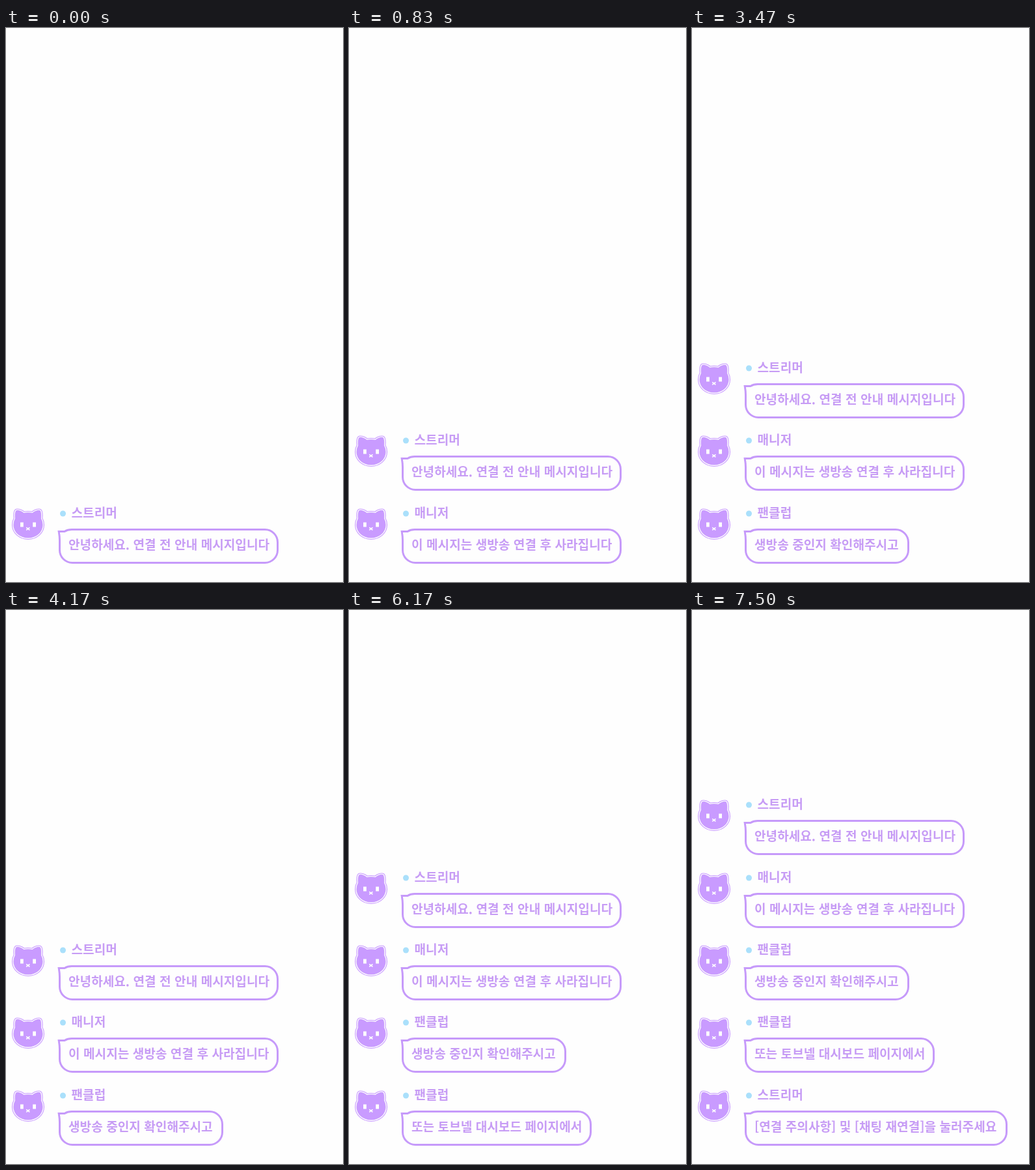
Animation of 518x850 px, one loop 8 s. Source, as an HTML page:

```html
<!DOCTYPE html>
<html lang="ko">
<head>
<meta charset="utf-8">
<title>채팅 안내</title>
<style>
  html, body { margin: 0; width: 100%; height: 100%; overflow: hidden; background: #fefefe; }
  svg { display: block; width: 518px; height: 850px; }
  text {
    font: 700 19.1px "Noto Sans CJK KR", "Noto Sans KR", "Noto Sans CJK", "Noto Sans CJK JP", sans-serif;
    word-spacing: .1px;
    fill: #c79cf5;
  }
  .bubble { fill: none; stroke: #c69afa; stroke-width: 3; stroke-linejoin: miter; }
  .dot { fill: #aae0fb; }
</style>
</head>
<body>
<svg id="stage" viewBox="0 0 518 850">
  <defs>
    <path id="head" d="M14 752.5C13.4 747 14 742 15.4 740.4C17.4 738.8 24 740.6 27.4 744Q34 742.6 40.6 744C44 740.6 50.6 738.8 52.6 740.4C54 742 54.6 747 54 752.5Q56.6 757 56.6 762.4A22.6 20.2 0 0 1 11.4 762.4Q11.4 757 14 752.5Z"/>
    <g id="cat">
      <use href="#head" fill="#c99bff" stroke="#c99bff" stroke-width="4.8"/>
      <use href="#head" fill="#c99bff" stroke="#fefefe" stroke-width="2.6"/>
      <use href="#head" fill="#c99bff"/>
      <path d="M22 758.5h4.8v7H22zM41.2 758.5h4.8v7h-4.8z" fill="#fefefe"/>
      <path d="M31.2 766.4l5.2 4M36.4 766.4L31.2 770.4" stroke="#fefefe" stroke-width="1.7"/>
    </g>
  </defs>
</svg>
<script>
const LOOP = 8000;
const LIFT = [0, 112, 223, 334, 446];
const FADE = [[0, .08], [30, .4], [70, .7], [100, 1]];
const QUICK = [[0, .08], [30, .55], [70, 1]];

// start time, right edge of the bubble, name, message, fade steps
const ROWS = [
  [0, 419, "스트리머", "안녕하세요. 연결 전 안내 메시지입니다", [[0, 1]]],
  [730, 419, "매니저", "이 메시지는 생방송 연결 후 사라집니다", FADE],
  [3400, 334, "팬클럽", "생방송 중인지 확인해주시고", QUICK],
  [6070, 373, "팬클럽", "또는 토브넬 대시보드 페이지에서", FADE],
  [7400, 485, "스트리머", "[연결 주의사항] 및 [채팅 재연결]을 눌러주세요", FADE]
];

const stage = document.getElementById("stage");

function add(parent, tag, attrs, text) {
  const el = document.createElementNS("http://www.w3.org/2000/svg", tag);
  for (const key in attrs) el.setAttribute(key, attrs[key]);
  if (text) el.textContent = text;
  parent.append(el);
  return el;
}

function bubblePath(right) {
  const r = 19.5, x = right - 1.5;
  return `M101 769.5H${x - r}a${r} ${r} 0 0 1 ${r} ${r}V${820.5 - r}` +
    `a${r} ${r} 0 0 1 ${-r} ${r}H${82.5 + r}a${r} ${r} 0 0 1 ${-r} ${-r}V786` +
    `Q82.5 780 81.2 772.5H90Q94.5 769.5 101 769.5Z`;
}

// Plays [time, value] pairs as held steps
function play(el, prop, steps) {
  const frames = steps.map(([t, v]) => ({ offset: t / LOOP, [prop]: v, easing: "step-end" }));
  frames.push({ offset: 1, [prop]: steps[steps.length - 1][1] });
  el.animate(frames, { duration: LOOP, iterations: Infinity });
}

ROWS.forEach(([start, right, name, message, fade], i) => {
  const row = add(stage, "g");
  add(row, "use", { href: "#cat" });
  add(row, "circle", { class: "dot", cx: 87.5, cy: 745, r: 4.5 });
  add(row, "text", { x: 100.5, y: 751 }, name);
  add(row, "path", { class: "bubble", d: bubblePath(right) });
  add(row, "text", { x: 96, y: 800.3 }, message);

  const shown = fade.map(([t, v]) => [start + t, v]);
  play(row, "opacity", start ? [[0, 0], ...shown] : shown);

  const moves = ROWS.slice(i).map(([t], k) => [k ? t : 0, `translateY(${-LIFT[k]}px)`]);
  play(row, "transform", moves);
});
</script>
</body>
</html>
```
